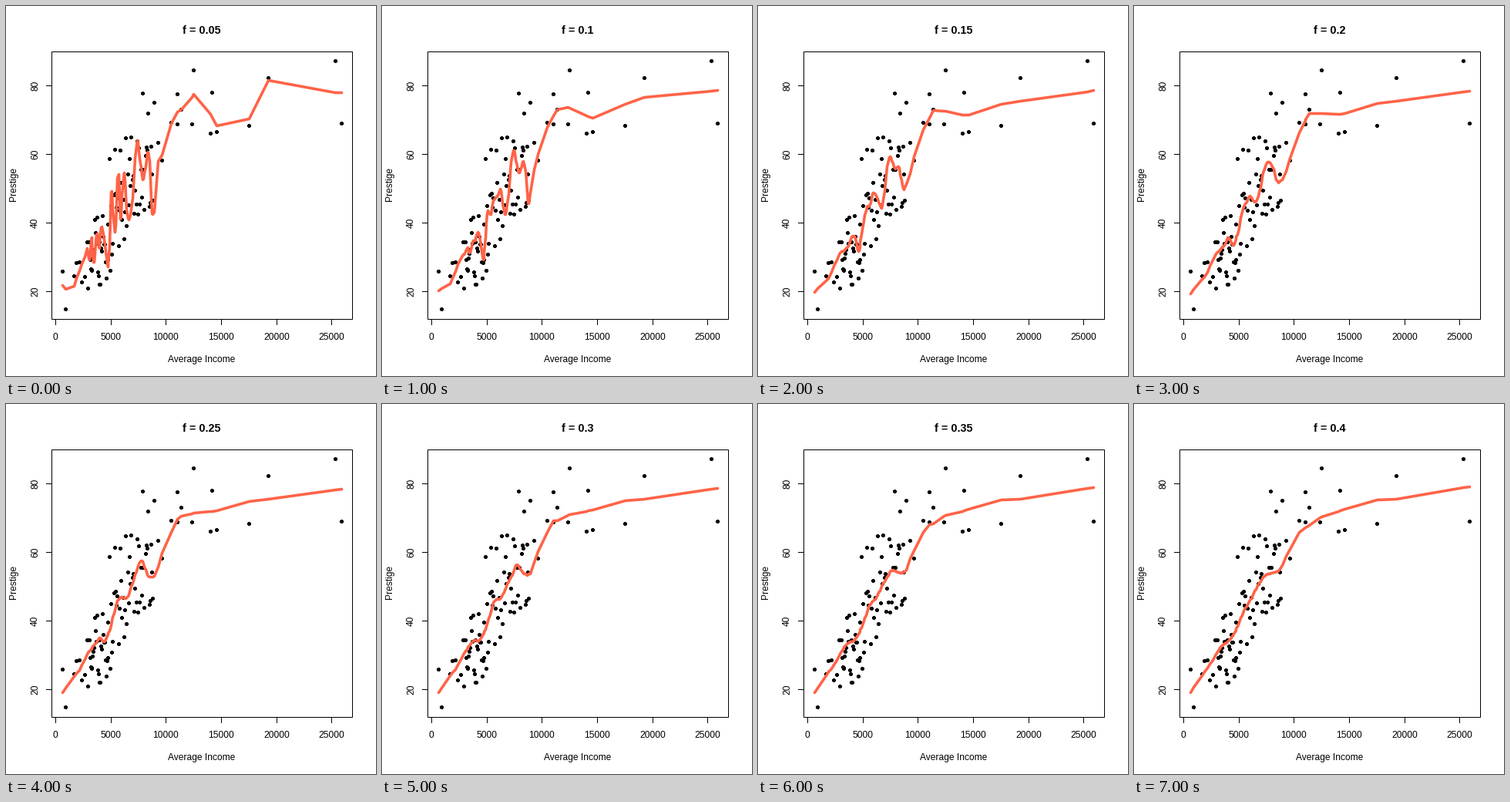
Recreate the animation shown at these times as a matplotlib script. Size 480 by 480 pixels, loop 8000 ms.

```python
import numpy as np
import matplotlib.pyplot as plt
from matplotlib.animation import FuncAnimation
from matplotlib.collections import PatchCollection
from matplotlib.patches import Circle

SIZE, DPI = 480, 96
PT = 72 / DPI  # points per pixel
LEFT, RIGHT, TOP, BOTTOM = 59.04, 449.76, 59.04, 406.56
MID_X, MID_Y = (LEFT + RIGHT) / 2, (TOP + BOTTOM) / 2
CROWD = 85
rng = np.random.default_rng(7)

# Isolated dots to the left and right of the crowd: income, prestige
poor = np.array([(611, 25.9), (918, 14.8)])
rich = np.array([
    (9271, 63.4), (9593, 58.3), (10432, 69.3), (11023, 68.8), (11030, 77.6),
    (11377, 73.1), (12351, 68.8), (12480, 84.6), (14032, 66.1), (14163, 78.1),
    (14558, 66.7), (17498, 68.4), (19263, 82.3), (25308, 87.2), (25879, 69.1)])

# Peaks and dips of the local mean inside the crowd
wiggle = np.array([
    (1656, 21.5), (2400, 28.5), (2900, 32.5), (3020, 27), (3220, 38),
    (3450, 26), (3700, 39), (3920, 31), (4130, 40), (4350, 36), (4720, 26),
    (4820, 28), (5050, 57), (5220, 38), (5450, 37), (5660, 62), (5840, 36),
    (6160, 58), (6500, 40), (6850, 43), (7350, 66), (7900, 51), (8400, 63),
    (8780, 38), (8895, 45)])

# The crowd thins out towards its low end
crowd = np.interp(np.arange(CROWD), [0, 5, 35, 58, CROWD - 1],
                  [1656, 2847, 4761, 6686, 8895])
income = np.concatenate([poor[:, 0], crowd, rich[:, 0]])
signal = np.concatenate([poor[:, 1], np.interp(crowd, *wiggle.T), rich[:, 1]])


def smooth(x, y, f):
    """Tricube-weighted local linear fit over a fraction f of the points."""
    span = int(f * len(x) + 1e-7)
    fit = []
    for xs in x:
        r = np.abs(x - xs)
        h = np.sort(r)[span - 1]
        w = (1 - np.minimum(r / h, 1) ** 3) ** 3
        fit.append(np.polyfit(x - xs, y, 1, w=np.sqrt(w))[1])
    return np.array(fit)


spans = [0.05 * k for k in range(1, 9)]
fits = [smooth(income, signal, f) for f in spans]

# Scatter the crowd about the smoothest curve, with some dots well above it
spread = rng.uniform(-13, 9, CROWD) * np.minimum(crowd / 4000, 1)
high = (np.arange(CROWD) % 6 == 0) & (crowd > 4500)
spread[high] = rng.uniform(10, 26, high.sum())
prestige = signal.copy()
inside = slice(len(poor), len(poor) + CROWD)
prestige[inside] = fits[-1][inside] + spread


def scaler(lo, hi, start, end):
    """Map data to pixels, leaving a 4% margin at both ends."""
    pad = 0.04 * (hi - lo)
    return lambda v: start + (v - lo + pad) / (hi - lo + 2 * pad) * (end - start)


to_x = scaler(611, 25879, LEFT, RIGHT)
to_y = scaler(14.8, 87.2, BOTTOM, TOP)


def pixel(v):
    return np.floor(v) + 0.5


plt.rcParams["font.family"] = "Liberation Sans"
fig = plt.figure(figsize=(SIZE / DPI, SIZE / DPI), dpi=DPI, facecolor="white")
ax = fig.add_axes([0, 0, 1, 1])
ax.set_xlim(0, SIZE)
ax.set_ylim(SIZE, 0)
ax.axis("off")


def stroke(xs, ys):
    ax.plot(xs, ys, color="black", lw=PT, snap=False, zorder=1,
            solid_joinstyle="miter")


def label(x, y, text, px=12, **kw):
    return ax.text(x, y, text, fontsize=px * PT, ha="center", va="baseline",
                   rotation_mode="anchor", **kw)


x0, x1, y0, y1 = (pixel(v) for v in (LEFT, RIGHT, TOP, BOTTOM))
stroke([x0, x1, x1, x0, x0], [y0, y0, y1, y1, y0])

for v in range(0, 25001, 5000):
    tx = pixel(to_x(v))
    stroke([tx, tx], [y1, y1 + 7])
    label(tx - 0.5, 433, str(v))
for v in range(20, 81, 20):
    ty = pixel(to_y(v))
    stroke([x0, x0 - 7], [ty, ty])
    label(41, ty - 0.5, str(v), rotation=90)

label(MID_X - 1, 462, "Average Income")
label(13, MID_Y - 1.5, "Prestige", rotation=90)
title = label(MID_X - 0.5, 36, "", px=14.4, weight="bold")

dots = [Circle(p, 2) for p in zip(pixel(to_x(income)), pixel(to_y(prestige)))]
ax.add_collection(PatchCollection(dots, facecolor="black", linewidth=0,
                                  antialiased=False, zorder=2))

curve, = ax.plot([], [], color="tomato", lw=3.6 * PT, zorder=3, snap=False,
                 solid_capstyle="round", solid_joinstyle="round")


def update(i):
    curve.set_data(pixel(to_x(income)), pixel(to_y(fits[i])))
    title.set_text(f"f = {spans[i]:g}")
    return curve, title


anim = FuncAnimation(fig, update, frames=len(spans), interval=1000, repeat=True)
plt.show()
```
